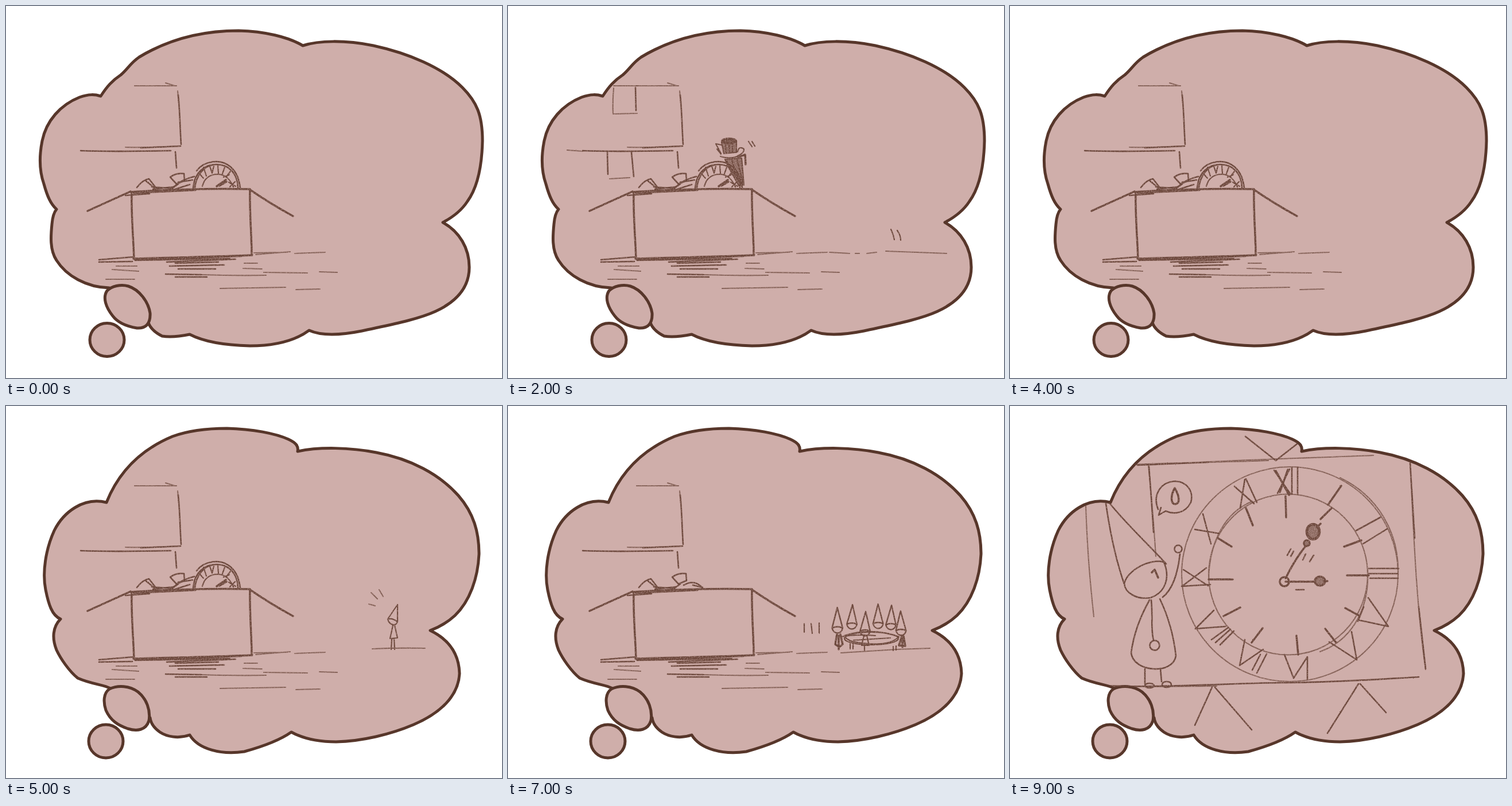
Animation, 864 px wide and 648 px high, one loop 10000 ms. Source, as an HTML page:

```html
<!DOCTYPE html>
<html lang="en">
<head>
<meta charset="utf-8">
<title>The clock in the box</title>
<style>
  html, body { margin: 0; width: 100%; height: 100%; overflow: hidden; background: #fff; }
  svg { display: block; width: 100vw; height: 100vh; }
  .cloud { fill: #cfaeaa; stroke: #57362a; stroke-width: 5; stroke-linejoin: round; }
  .sketch { fill: none; stroke: #6a463a; stroke-width: 2.6; stroke-linecap: round; stroke-linejoin: round; filter: url(#pencil); }
  .bold { stroke-width: 3.5; }
  .heavy { stroke-width: 4.6; }
  .soft { stroke-width: 2.1; opacity: .75; }
  .tone { fill: #6a463a; fill-opacity: .65; }
  .small { stroke-width: 2.2; }
  [data-at] { display: none; }
</style>
</head>
<body>
<svg viewBox="0 0 864 648">
  <defs>
    <filter id="pencil" filterUnits="userSpaceOnUse" x="0" y="0" width="864" height="648" color-interpolation-filters="sRGB">
      <feTurbulence type="fractalNoise" baseFrequency=".5" numOctaves="2" seed="4" result="grain"/>
      <feDisplacementMap in="SourceGraphic" in2="grain" scale="1.6" xChannelSelector="R" yChannelSelector="G" result="rough"/>
      <feColorMatrix in="grain" values="0 0 0 0 0  0 0 0 0 0  0 0 0 0 0  0 0 0 1.4 .2" result="mask"/>
      <feComposite in="rough" in2="mask" operator="in"/>
    </filter>
    <path id="head" d="M-8-8L1-39L8-8Q0-12-8-8C-6 2 6 2 8-8"/>
    <path id="body" d="M-3 0L-5 16H5L3 0M-2 16V28M3 16V28"/>
    <g id="figure" class="small">
      <path class="tone" d="M590 315L620 310L622 336L594 340Z"/>
      <path d="M592 318L620 315M592 323L620 320M594 329L621 326M595 335L621 332"/>
      <path class="heavy" d="M588 354C604 353 620 349 637 347"/>
      <path d="M594 340L584 330Q588 341 599 347M622 336L629 338L628 332H637V347M602 354C604 363 620 364 626 353M628 362Q636 361 634 372Q630 378 626 371"/>
      <path class="tone" d="M609 360L606 396L632 394L626 360Z"/>
      <path d="M609 361V394M615 362L612 395M621 362L619 395M626 362L629 394"/>
      <path class="bold" d="M610 396Q610 411 602 425L595 423M625 396L631 427L640 428"/>
    </g>
  </defs>

  <!-- thought clouds -->
  <g class="cloud">
    <g data-at="0 2 4 8">
      <path d="M165 157C176 140 185 130 200 120C212 110 216 100 232 89C275 63 330 43 405 43C450 44 492 54 517 69C545 60 590 59 640 69C700 82 760 107 795 142C820 167 830 190 830 235C829 280 822 315 804 340C793 357 778 368 761 377C790 393 807 422 807 455C807 490 785 515 748 532C715 547 665 556 620 566C585 573 550 575 528 565C505 582 470 592 425 592C385 591 345 585 320 572C300 576 285 577 272 575C262 570 252 562 248 552L180 491C140 490 105 470 88 443C76 425 78 400 80 380C81 368 83 360 88 354C78 345 72 332 66 310C59 290 57 265 63 235C70 200 95 172 128 159C145 153 155 154 165 157Z"/>
      <path d="M176 496C184 488 200 484 213 488C232 494 248 515 251 535C252 555 242 562 228 561C210 558 195 552 186 540C174 525 168 508 176 496Z"/>
      <ellipse cx="176" cy="581.5" rx="30" ry="29"/>
    </g>
    <g data-at="1 3 5 7 9">
      <path d="M175 168C195 118 230 78 290 53C320 42 350 39 385 39C430 40 470 48 492 58C505 64 510 70 508 79C545 71 600 72 645 81C705 92 755 119 788 156C815 187 824 220 824 258C822 300 808 340 782 365C768 378 755 385 739 391C770 406 789 430 790 466C788 505 757 535 710 555C670 572 620 584 575 585C540 585 515 578 497 568C480 580 455 591 415 602C375 608 335 598 320 573C300 580 280 576 268 568C258 561 252 552 251 543L182 492C170 485 150 485 125 474C110 462 95 440 88 425C80 405 81 385 95 371C80 365 74 345 69 320C63 290 69 250 84 217C100 185 135 158 175 168Z"/>
      <path d="M180 493C195 486 215 487 230 498C245 510 252 530 249 548C244 565 228 567 212 562C195 556 182 548 174 530C169 515 170 500 180 493Z"/>
      <ellipse cx="174" cy="584" rx="30" ry="29"/>
    </g>
    <g data-at="6">
      <path d="M364 79C385 62 415 50 450 42C490 34 540 34 585 45C630 54 655 65 670 78C685 92 700 96 710 106L724 122C745 115 775 122 800 140C828 162 842 195 844 230C845 265 840 295 826 307C836 313 836 325 840 350C847 375 845 395 832 413C815 438 785 450 750 456L690 525C682 542 672 551 655 552L622 553C590 573 540 588 490 588C460 588 435 585 416 572C405 582 390 586 360 586C310 583 260 581 210 575C165 566 135 540 127 510C120 475 130 440 161 416C125 405 100 380 87 340C76 300 69 255 75 230C84 190 140 138 203 110C255 87 325 69 364 79Z"/>
      <path d="M720 455C735 450 752 452 760 462C766 480 760 500 745 515C728 530 705 535 692 525C682 510 684 485 697 468C704 460 712 457 720 455Z"/>
      <ellipse cx="767" cy="544" rx="29" ry="30"/>
    </g>
  </g>

  <g class="sketch">
    <!-- box, wall and floor -->
    <g data-at="0 1 2 3 4 5 6 7">
      <path class="soft" d="M224 139H297M278 134L294 139M208 246Q255 247 303 244M299 148L301 170"/>
      <path d="M300 155C303 185 303 210 305 241M235 247L304 244M130 252C180 254 240 253 287 252M295 254L297 282"/>
      <path class="bold" d="M219 325C218 365 222 405 223 441M222 440C290 438 360 437 429 434M425 320C424 360 428 400 428 434M217 324C260 321 350 317 425 319M142 357L217 323M425 320Q460 344 500 366"/>
      <path d="M208 330L250 327M222 326L330 321M162 442L223 437M225 442L410 436M162 446L220 445M225 443L390 440"/>
      <path d="M280 446L400 441M295 448L370 446M285 453L380 451M300 458L365 458M278 467L340 468M295 472H350"/>
      <path class="soft" d="M192 453H228M185 459L231 462M174 476H224M340 468Q400 470 453 469M415 448H438M413 457L446 458"/>
      <path class="soft" d="M435 433L495 428M432 430L490 429M503 431L556 429M449 464L525 465M546 463L577 464M373 492L487 490M505 494L547 493"/>
      <path d="M228 316Q238 303 249 301L266 323L244 305M254 315L290 318M256 319L292 315M286 298Q297 290 310 292L311 304L297 310L286 298M288 319L300 310"/>
    </g>
    <g data-at="0 1 2 3 4 5 6">
      <path d="M291 316Q308 301 328 297M300 307L325 303M295 319L320 311M326 317C328 289 347 276 366 276C390 276 403 293 404 316M332 287C345 270 373 265 391 280C402 290 406 301 408 317M329 316C332 294 345 279 360 277"/>
      <path class="small" d="M342 314C346 298 358 293 370 293Q387 294 396 315M336 291L344 300M344 281L349 296M355 279L359 291L362 279M369 278L370 291M381 281L377 292M391 288L384 297M389 294L379 298M388 307L400 314M399 306L390 315"/>
      <path class="bold" d="M367 314L383 303M372 313L384 306"/>
    </g>
    <path data-at="7" d="M306 312Q325 301 339 317M322 312L339 316"/>
    <g data-at="1 2 3">
      <path class="soft" d="M184 139H226M184 143Q182 166 183 188M184 188L225 187M103 251L130 253M177 301L212 299M658 427Q710 429 764 431"/>
      <path d="M222 142L223 182M173 255L174 293M215 254L219 297"/>
    </g>
    <path class="soft" data-at="2" d="M560 429L595 431M605 431H612M625 431L642 429"/>

    <!-- visitor in the tall hat -->
    <use data-at="1" href="#figure" transform="translate(1260) scale(-1 1)"/>
    <g data-at="2" class="small">
      <path class="tone" d="M372 237L376 257L398 255V235Q385 229 372 237Z"/>
      <ellipse class="bold tone" cx="385" cy="235" rx="12" ry="4"/>
      <path d="M379 242L380 255M385 241L386 255M391 241V255M370 262Q385 267 400 262"/>
      <path d="M372 242L362 240L371 257M364 249L371 258M400 254Q402 243 411 249Q412 256 400 261"/>
      <path class="tone" d="M378 267L384 281L402 313L411 312L407 265Z"/>
      <path d="M381 270L402 306M389 267L406 312M399 267L410 312"/>
      <path class="bold" d="M401 263L413 259L414 276"/>
      <path d="M419 236L425 245M425 236L430 244M667 389Q671 397 673 407M678 391Q684 399 684 408"/>
    </g>
    <g data-at="3">
      <use href="#figure"/>
      <path d="M600 348C581 337 563 350 563 370C565 391 587 394 604 387"/>
      <path class="soft" d="M576 387L586 366M581 389L590 367M587 390L594 369M593 389L598 371M586 366Q596 359 606 360"/>
      <path d="M536 396L535 413M547 398L550 412"/>
    </g>

    <!-- gnomes -->
    <g data-at="5">
      <path class="small" d="M665 371L682 346V376Q674 369 665 371C667 381 678 385 682 376M674 382L669 405L682 404L677 382M672 405L671 424M676 405L677 424"/>
      <path class="soft" d="M638 423Q684 421 730 422M636 325L647 336M650 320L657 332M632 345L643 348"/>
    </g>
    <g data-at="6" class="small">
      <g id="wanderers"></g>
      <path class="soft" d="M638 423Q684 421 730 422M416 262L416 263"/>
      <path d="M731 381V394M737 387L739 394M670 423H676M325 283L322 314M331 282L328 300M413 303L415 318M421 303L420 318"/>
    </g>
    <g data-at="7" class="small">
      <g id="carriers"></g>
      <ellipse cx="633" cy="405" rx="47" ry="11"/>
      <path d="M586 400Q632 385 681 402Q664 419 618 413Q590 411 586 400M602 408L666 404M580 402Q606 397 640 400"/>
      <path class="bold" d="M573 398L570 415L577 420L583 415L579 398M686 401L681 417L692 418L689 401M576 400V424M687 401V420"/>
      <path d="M596 414V423M601 415V423M620 400L616 417H629L625 400M621 417V426M671 419V426M676 418V425M516 379V394M528 379L530 396M542 378V395"/>
      <path class="soft" d="M580 430L677 424L735 422"/>
    </g>

    <!-- close view of the clock -->
    <g data-at="8 9">
      <path class="soft" d="M218 102C300 98 380 98 450 95M330 98C450 92 540 90 633 86M132 174C135 260 140 310 146 367M241 103Q250 195 254 262M697 97C703 220 708 350 724 459M176 487C280 491 320 487 360 488"/>
      <path d="M222 103L345 98M410 53L463 95L500 66M242 105Q247 170 250 220M697 100L705 230M712 350L724 458M180 488C300 490 380 483 470 482C560 482 640 476 712 472M352 490L322 556M357 490L421 564M607 484L553 570M610 484L655 534"/>
      <g class="soft">
        <ellipse cx="487.500" cy="293" rx="188.500" ry="187"/>
        <ellipse cx="484.500" cy="293.500" rx="138.500" ry="140"/>
        <path d="M575 125C640 156 678 220 676 292M346 300C348 235 375 185 422 166M623 285C627 360 590 410 540 428"/>
      </g>
      <path class="bold" d="M480 157L481 194M411 178L423 208M362 230L386 245M346 302H388M372 366L401 351M421 412L440 387M499 400L502 433M549 388L568 412M584 352L608 365M587 295H625M582 245L612 234M541 197L560 178"/>
      <path d="M460 112L489 154M487 110L466 152M491 107V153M501 107V153M603 217L645 194M615 240L657 214M625 283H677M625 292H676M627 300H676M608 373L659 384L624 334M606 375L616 350M556 411L604 442L595 393M478 433L494 474L518 437V476"/>
      <path d="M409 407L400 452L441 424M422 460L436 433M430 465L447 432M355 356L323 388L376 384M351 407L380 386M358 412L384 389M366 416L390 392M302 285L345 313M342 282L301 313M299 314L349 311M322 215L364 222M336 188L350 240M391 140L425 170M409 128L401 178M411 127L430 168"/>
      <path class="bold" d="M577 139L554 172M463 113L486 155M484 111L470 150"/>
      <circle class="bold" cx="478" cy="306" r="8"/>
      <g id="minute">
        <path class="bold" d="M480 300Q497 266 515 244M535 211L541 205"/>
        <circle class="bold tone" cx="517" cy="239" r="5"/>
        <ellipse class="heavy tone" cx="528" cy="219" rx="11" ry="13"/>
      </g>
      <path class="bold" d="M480 306H530M547 305H553"/>
      <ellipse class="bold tone" cx="540" cy="305" rx="9" ry="8"/>
      <path d="M167 170C175 225 185 270 199 310M174 170C205 208 240 240 272 275M199 309C205 285 245 265 268 272C280 300 270 325 245 334C220 338 200 325 199 309"/>
      <path d="M243 338C225 370 215 400 211 430C215 465 285 468 289 435C285 400 275 365 261 336M246 338C249 365 245 390 250 408M235 458V484M262 457L264 480M266 333C285 318 293 285 296 258"/>
      <path class="bold" d="M247 290L252 285L258 299"/>
      <circle cx="252" cy="417" r="8.500"/>
      <circle cx="293" cy="249" r="6.500"/>
      <ellipse cx="243" cy="487" rx="8" ry="4"/>
      <ellipse cx="273" cy="485" rx="8" ry="5"/>
    </g>
    <g data-at="9">
      <path d="M258 180C248 155 262 132 288 131C310 132 320 150 315 168C305 188 285 189 271 183L259 190L263 177"/>
      <path class="bold" d="M287 143C280 155 279 170 288 171C298 169 294 155 287 143Z"/>
      <path d="M483 260L489 249M489 262L494 253M510 268L515 258M522 271L529 260M498 320H512"/>
    </g>
  </g>
</svg>
<script>
  const byId = id => document.getElementById(id);
  const scenes = [...document.querySelectorAll('[data-at]')]
    .map(node => ({ node, seconds: node.dataset.at.split(' ').map(Number) }));

  // x and y mark the chin; lean slants the hat.
  const gnome = ([x, y, lean = 0, size = 1, hasBody = false]) =>
    `<g transform="translate(${x} ${y})">
      <use href="#head" transform="skewX(${-lean}) scale(${size})"/>
      ${hasBody ? '<use href="#body"/>' : ''}
    </g>`;

  byId('wanderers').innerHTML = [
    [592, 400, 8, .9, true], [657, 394, 8, .9, true], [693, 394, 9, .9, true],
    [327, 283, 0, .9], [388, 280, -5, 1], [416, 305, 3, .9]
  ].map(gnome).join('');

  byId('carriers').innerHTML = [
    [574, 396, -2, 1.15], [599, 389, 0, 1.1], [622, 401, 0, 1.1],
    [645, 388, -2, 1.1], [667, 390, 0, 1.1], [685, 400, -3, 1.1]
  ].map(gnome).join('');

  let shown = -1;
  function draw(now) {
    const second = Math.floor(now / 1000) % 10;
    if (second !== shown) {
      shown = second;
      for (const { node, seconds } of scenes)
        node.style.display = seconds.includes(second) ? 'inline' : 'none';
      byId('minute').setAttribute('transform', `rotate(${second === 8 ? -30 : 0} 478 306)`);
    }
    requestAnimationFrame(draw);
  }
  draw(performance.now());
</script>
</body>
</html>
```
